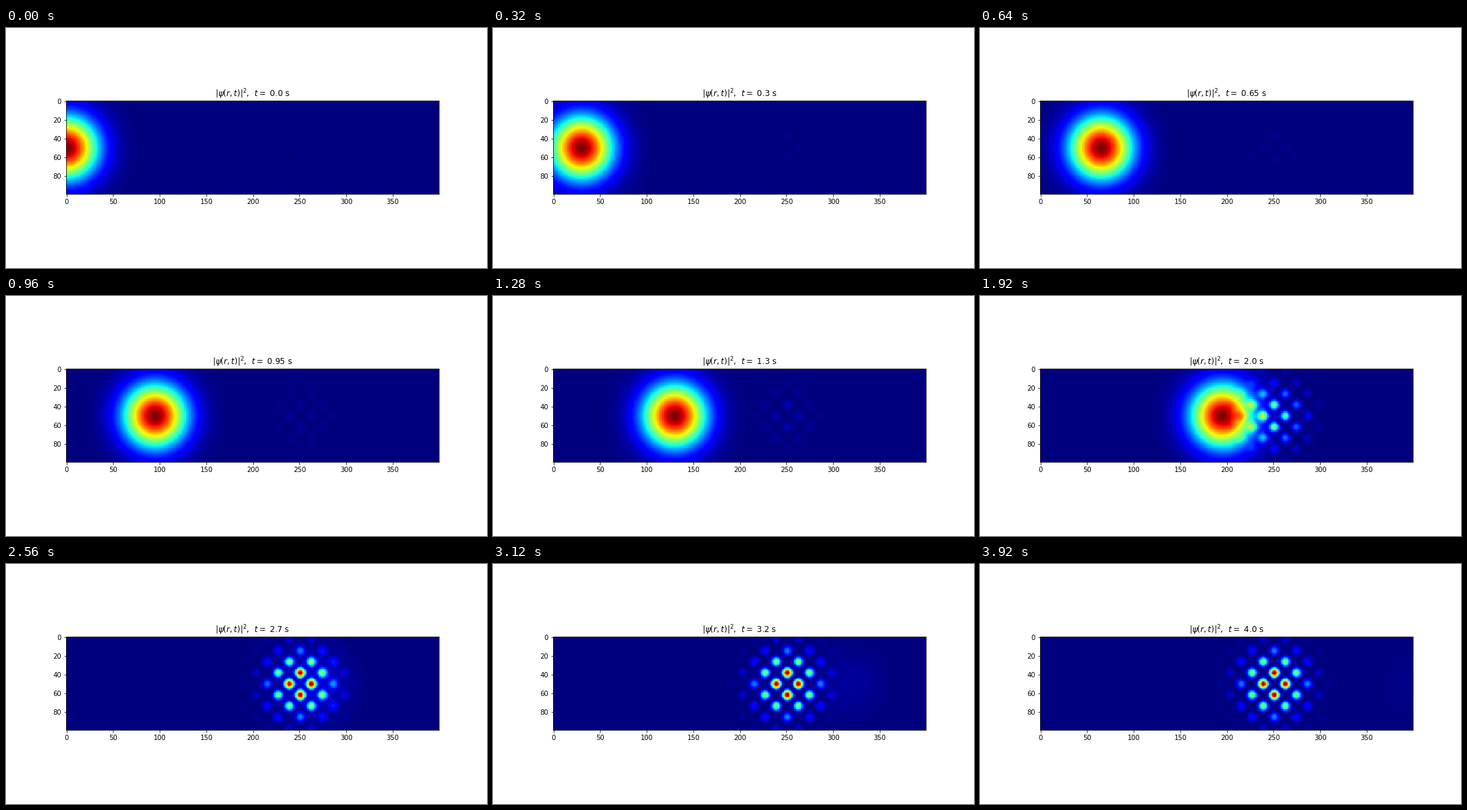
Write a matplotlib script that moves like this. It is 720 by 360 pixels and loops after 4 s.

```python
import numpy as np
import matplotlib.pyplot as plt
from matplotlib.animation import FuncAnimation

NX, NY = 400, 100
FRAMES, INTERVAL = 50, 80
DT = 0.05        # simulation step, s
SPEED = 100      # drift of the packet, cells per second
X0, Y0 = 250.8, 50
PITCH = 12.2     # lattice spacing in cells
T_CROSS, TAU = 2.1, 0.36

plt.rcParams.update({"font.family": "DejaVu Sans", "font.size": 10})

x, y = np.meshgrid(np.arange(NX), np.arange(NY))


def gauss(cx, width):
    return np.exp(-((x - cx) ** 2 + (y - Y0) ** 2) / width)


def wave(u):
    return np.cos(np.pi * u / PITCH)


lattice = gauss(X0, 850) * (wave(x - X0) - wave(y - Y0)) ** 2
lattice /= lattice.max()


def sim_time(frame):
    """Playback at 12 fps of a 20 fps run, with one held picture near the end."""
    i = frame - (frame > 46)
    return max(0, (5 * i - 1) // 3) * DT


def density(t):
    """Moving packet that hands its weight to the lattice at an avoided crossing."""
    weight = np.exp(2 * np.arcsinh((t - T_CROSS) / TAU))
    rho = gauss(SPEED * t, 1058) + weight * lattice
    return rho / rho.max()


fig = plt.figure(figsize=(10, 5), dpi=72, facecolor="white")
ax = fig.add_axes([0.125, 0.1028, 0.775, 0.8])
img = ax.imshow(density(0), cmap="jet", vmin=0, vmax=1, interpolation="nearest")
ax.set_xticks(range(0, NX, 50))
ax.set_yticks(range(0, NY, 20))
title = ax.set_title("", fontsize=12)


def update(frame):
    t = sim_time(frame)
    img.set_data(density(t))
    title.set_text(rf"$|\psi(r,t)|^2$,  $t =$ {t:.2} s")
    return img, title


anim = FuncAnimation(fig, update, frames=FRAMES, interval=INTERVAL,
                     repeat=True, repeat_delay=0, blit=False)
plt.show()
```
